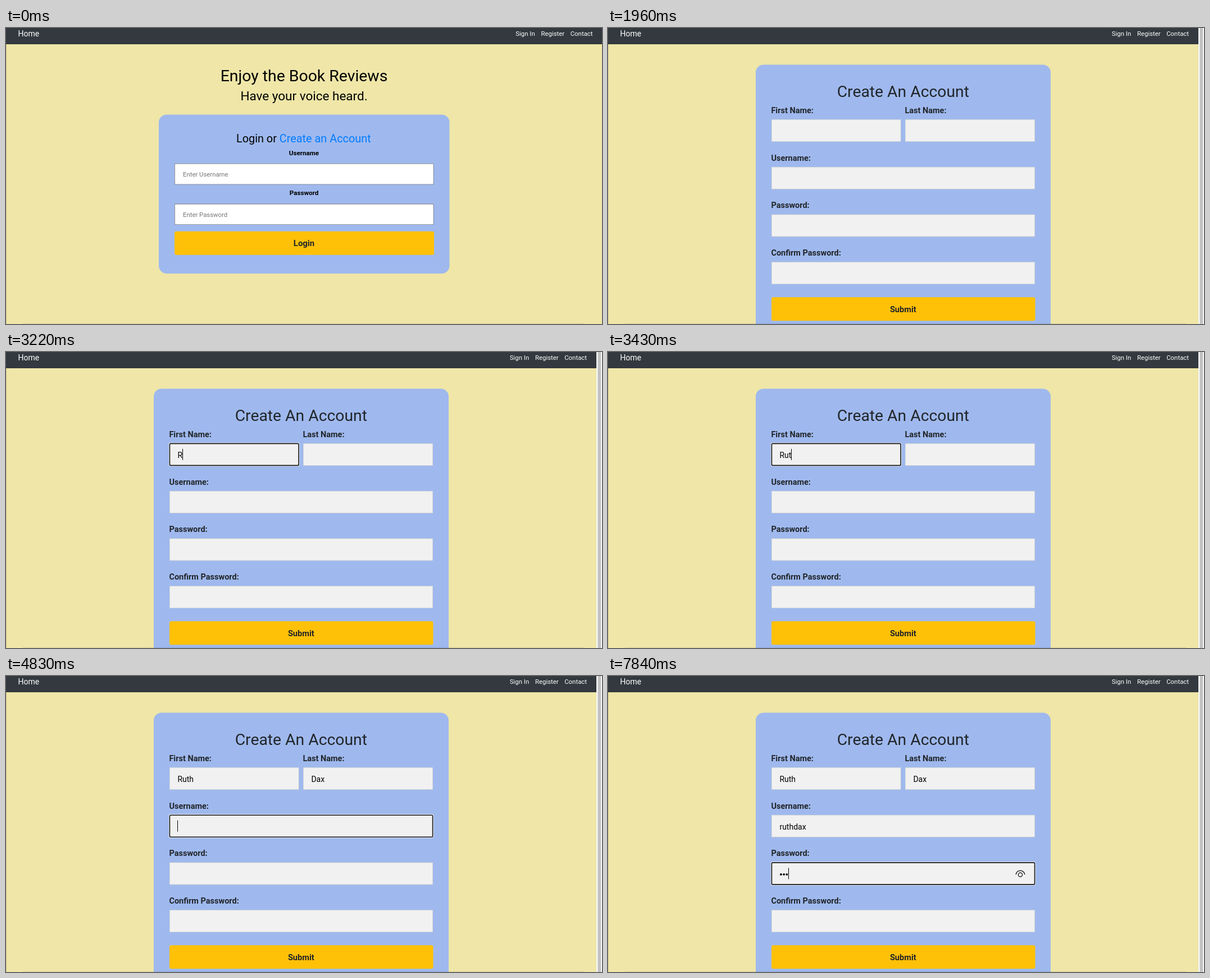
These frames come from a looping animation (1061 px wide and 528 px high, 8 s). An HTML page with a canvas:

```html
<!DOCTYPE html>
<html lang="en">
<head>
<meta charset="utf-8">
<title>Book Reviews</title>
<style>
html, body { margin: 0; width: 100%; height: 100%; overflow: hidden; background: #efe6a8; }
canvas { display: block; width: 1061px; height: 528px; }
</style>
</head>
<body>
<canvas id="stage"></canvas>
<script>
const W = 1061, H = 528, LOOP = 8000;
const canvas = document.getElementById('stage');
const ctx = canvas.getContext('2d');
const dpr = window.devicePixelRatio || 1;
canvas.width = W * dpr;
canvas.height = H * dpr;

const PAGE = 'Roboto, Arial, sans-serif';
const SYSTEM = 'Inter, Arial, sans-serif';
const INK = '#212529';
const HOVER = 1540, REGISTER = 1960;

// on/off: focus times, keys: when each character is typed
const fields = [
  { x: 291, y: 163, w: 230.5, text: 'Ruth', on: 2590, off: 3920, keys: [3150, 3290, 3430, 3640] },
  { x: 529, y: 163, w: 231, text: 'Dax', on: 3920, off: 4830, keys: [4340, 4410, 4620] },
  { x: 291, y: 247.8, w: 469, text: 'ruthdax', on: 4830, off: 6930,
    keys: [5320, 5460, 5530, 5740, 5880, 6020, 6090] },
  { x: 291, y: 332.5, w: 469, text: '•••', on: 6930, off: LOOP, secret: true, keys: [7420, 7630, 7840] },
  { x: 291, y: 417.2, w: 469, text: '', on: LOOP, off: LOOP, keys: [] }
];

const popups = [
  { x: 290, h: 245, from: 2660, fade: 3150, to: 3220, scroll: true,
    items: ['Nestor Quillanbery', 'delwyn harcombe', 'Ivo Mambleton', 'Gus Thorl',
            'Remy Holdwen', 'Nestor Quill', 'Edric Vay'] },
  { x: 528.7, h: 114, from: 4340, fade: 4410, to: 4480, items: ['d d', 'Deb Deb Deb'] }
];

function text(str, x, y, size, color, { weight = 400, align = 'left', family = PAGE } = {}) {
  ctx.font = `${weight} ${size}px ${family}`;
  ctx.textAlign = align;
  ctx.fillStyle = color;
  ctx.fillText(str, x, y);
  return ctx.measureText(str).width;
}

function rect(x, y, w, h, color) {
  ctx.fillStyle = color;
  ctx.fillRect(x, y, w, h);
}

function round(x, y, w, h, r, color) {
  ctx.beginPath();
  ctx.roundRect(x, y, w, h, r);
  ctx.fillStyle = color;
  ctx.fill();
}

function stroke(color, width, path) {
  ctx.beginPath();
  path();
  ctx.strokeStyle = color;
  ctx.lineWidth = width;
  ctx.stroke();
}

function button(label, x, y, w, h, mid, base, size) {
  round(x, y, w, h, 3, '#ffc107');
  text(label, mid, base, size, INK, { weight: 700, align: 'center' });
}

function frame(width, shift) {
  rect(0, 0, W, H, '#efe6a8');
  rect(0, 0, width, 29, '#33393f');
  text('Home', 21.5, 15, 14, '#fff');
  [['Sign In', 907.3], ['Register', 952.5], ['Contact', 1004.7]]
    .forEach(([label, x]) => text(label, x - shift, 14, 11.4, '#fff'));
}

function loginPage(t) {
  const mid = { align: 'center' }, bold = { align: 'center', weight: 700 };
  frame(W, 0);
  text('Enjoy the Book Reviews', 530.5, 94.5, 28.4, '#000', mid);
  text('Have your voice heard.', 530.5, 128.5, 22.5, '#000', mid);
  round(272, 154.5, 517.5, 283.5, 14, '#9fb9ee');

  const x = 410 + text('Login or ', 410, 204, 19.85, '#000');
  const hover = t >= HOVER;
  const color = hover ? '#0056b3' : '#007bff';
  const w = text('Create an Account', x, 204, 19.85, color);
  if (hover) rect(x, 205.6, w, 1.4, color);

  [['Username', 227, 241.8], ['Password', 298.4, 313.6]].forEach(([label, base, y]) => {
    text(label, 530.5, base, 11.65, '#000', bold);
    round(300, y, 461.5, 37.4, 1.5, '#767676');
    round(300.8, y + .8, 459.9, 35.8, 1, '#fff');
    text('Enter ' + label, 315, y + 23.4, 11.35, '#757575');
  });
  button('Login', 300, 362.8, 462, 42, 530.5, 389, 14.9);
}

function eye(x, y) {
  stroke('#111', 1.3, () => ctx.arc(x, y + 2, 3.6, 0, Math.PI * 2));
  stroke('#111', 1.3, () => {
    ctx.moveTo(x - 8, y + 1.6);
    ctx.bezierCurveTo(x - 5.5, y - 7.6, x + 5.5, y - 7.6, x + 8, y + 1.6);
  });
}

function drawField(f, t) {
  const h = 39.8;
  const focused = t >= f.on && t < f.off;
  const typed = f.keys.filter(k => t >= k);
  if (focused) {
    round(f.x - 1.2, f.y - 1.2, f.w + 2.4, h + 2.4, 3, '#fff');
    round(f.x - .4, f.y - .4, f.w + .8, h + .8, 2.5, '#101010');
    round(f.x + 1.2, f.y + 1.2, f.w - 2.4, h - 2.4, 1, '#f1f1f1');
  } else {
    rect(f.x, f.y, f.w, h, '#ccc');
    rect(f.x + .7, f.y + .7, f.w - 1.4, h - 1.4, '#f1f1f1');
  }

  const x = f.x + 14.4;
  let end = x;
  if (f.secret) {
    typed.forEach((_, i) => round(x + .6 + i * 5.2, f.y + 19.5, 3.8, 3.8, 1.9, '#000'));
    end += typed.length * 5.2;
    if (typed.length) eye(734, 352.5);
  } else {
    end += text(f.text.slice(0, typed.length), x, f.y + 25.8, 14, '#000');
  }

  const last = Math.max(f.on + 70, ...typed);
  if (focused && t - last < 490) rect(Math.round(end), f.y + 9.8, 1, 20, '#000');
}

function personIcon(x, y) {
  stroke('#eee', 1, () => ctx.arc(x - .6, y - 2.6, 2.1, 0, Math.PI * 2));
  stroke('#eee', 1, () => {
    ctx.moveTo(x - .5, y + 4.3);
    ctx.bezierCurveTo(x - 6, y + 4.5, x - 5.5, y + .8, x - 3, y + .9);
    ctx.lineTo(x + 1, y + .9);
  });
  round(x + .6, y + 1.4, 4.6, 3.6, .8, '#eee');
}

function drawPopup(p, t) {
  if (t < p.from || t >= p.to) return;
  const y = 203, w = 231.6, foot = y + p.h - 31;
  const sys = { family: SYSTEM };
  ctx.save();
  ctx.globalAlpha = t >= p.fade && p.scroll ? .5 : 1;
  ctx.shadowColor = 'rgba(0,0,0,.3)';
  ctx.shadowBlur = 7 * dpr;
  ctx.shadowOffsetY = 2 * dpr;
  round(p.x, y, w, p.h, 4, '#4a4a4a');
  ctx.shadowColor = 'transparent';

  text("Type '/' to search from your saved info", p.x + 8.7, 218.8, 7.6, '#bdbdbd', sys);
  const cx = p.x + 220.6, cy = 216;
  stroke('#e2e2e2', .9, () => {
    ctx.moveTo(cx - 3, cy - 3); ctx.lineTo(cx + 3, cy + 3);
    ctx.moveTo(cx + 3, cy - 3); ctx.lineTo(cx - 3, cy + 3);
  });
  p.items.forEach((name, i) =>
    text(name, p.x + 9.8, 244.4 + i * 27.25, 8.4, '#fff', { family: SYSTEM, weight: 600 }));
  if (p.scroll) {
    rect(p.x + 221, 225, 10.2, foot - 225, '#2b2b2b');
    round(p.x + 223.4, 227, 5.2, 128.5, 2.6, '#707070');
  }
  rect(p.x, foot - .4, w, .9, '#666');
  personIcon(p.x + 14, foot + 15.8);
  text('Manage personal info', p.x + 27.8, foot + 18.4, 8.3, '#f2f2f2', sys);
  ctx.restore();
}

function registerPage(t) {
  frame(1051, 10.5);
  rect(1051, 0, 10, H, '#f7f7f7');
  rect(1053.5, 0, 5.5, H, '#c1c1c1');

  round(263, 65.5, 525, 500, 14, '#9fb9ee');
  text('Create An Account', 525.3, 123, 28.3, INK, { align: 'center' });
  [['First Name:', 291, 152], ['Last Name:', 529, 152], ['Username:', 291, 236.6],
   ['Password:', 291, 321.3], ['Confirm Password:', 291, 406]]
    .forEach(([label, x, y]) => text(label, x - .6, y, 14.5, INK, { weight: 700 }));
  fields.forEach(f => drawField(f, t));
  button('Submit', 291, 480.2, 469.5, 42, 525.3, 506.6, 14.6);
  popups.forEach(p => drawPopup(p, t));
}

function draw(now) {
  const t = now % LOOP;
  ctx.setTransform(dpr, 0, 0, dpr, 0, 0);
  (t < REGISTER ? loginPage : registerPage)(t);
  // window edges
  rect(0, 29, .8, H, 'rgba(0,0,0,.2)');
  rect(30, 526.6, 1000, 1.4, 'rgba(0,0,0,.08)');
}

const start = performance.now();
function tick() {
  draw(performance.now() - start);
  requestAnimationFrame(tick);
}
tick();
</script>
</body>
</html>
```
